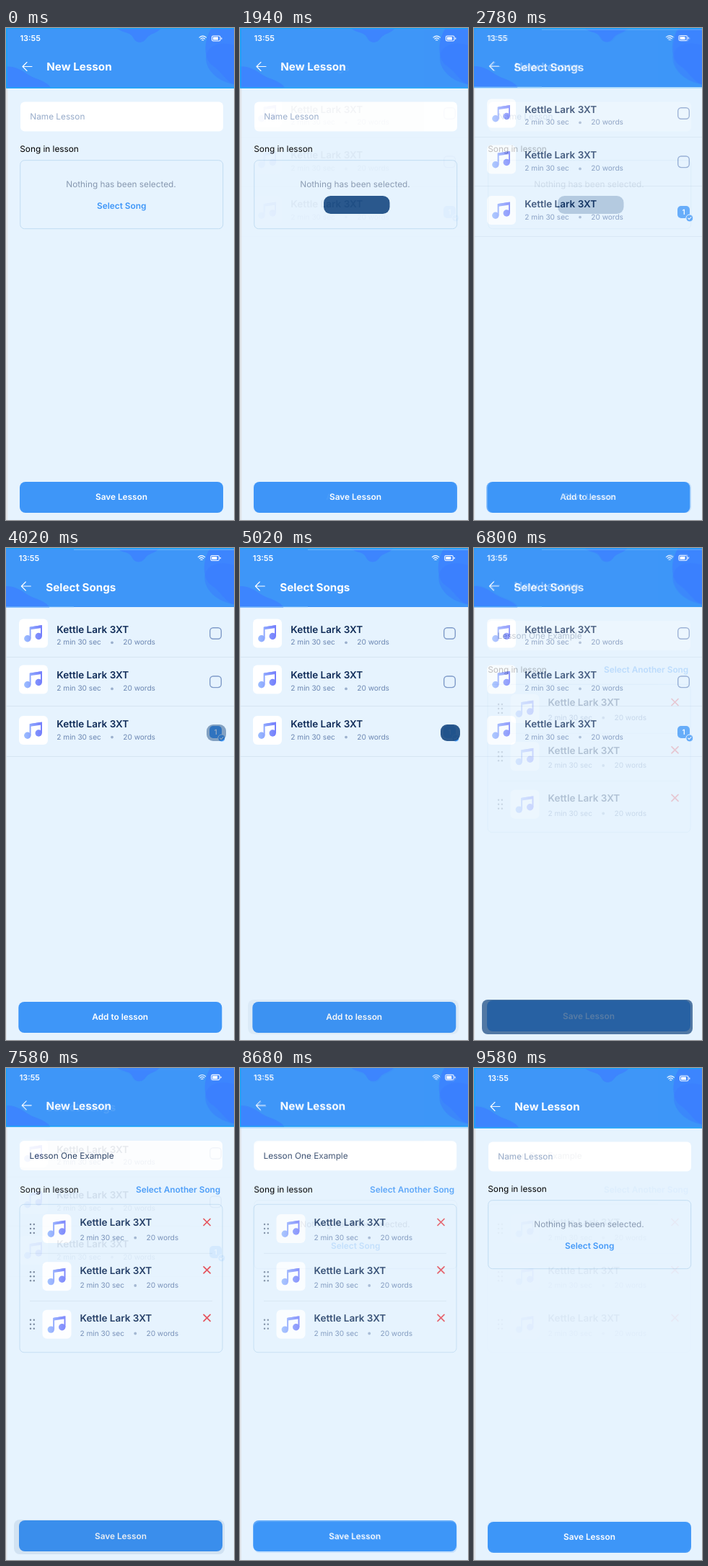
Recreate the animation shown at these times as an HTML page. Size 316 by 683 pixels, loop 9640 ms.

```html
<!DOCTYPE html>
<html lang="en">
<head>
<meta charset="utf-8">
<title>New Lesson</title>
<style>
  html, body { margin: 0; width: 100%; height: 100%; overflow: hidden; background: #e6f3fe; }
  svg.stage { display: block; width: 100vw; height: 100vh; }
  text { font: 400 11.8px Inter, sans-serif; text-rendering: geometricPrecision; }
  .mid { text-anchor: middle; }
  .semi { font-weight: 600; }
  .title { font-size: 15.2px; font-weight: 700; fill: #fff; }
  .clock { font-size: 10.9px; font-weight: 600; fill: #fff; }
  .name { font-size: 13.5px; font-weight: 600; fill: #0f2b57; }
  .meta { font-size: 10.1px; fill: #6c87b2; }
  .badge { font-size: 10px; font-weight: 600; fill: #fff; }
  .white { fill: #fff; }
  .blue { fill: #3e96f8; }
  .page { fill: #e6f3fe; }
  .blob { fill: #3d85fe; }
  .edge { fill: #e1e5ea; }
  .frame { fill: none; stroke: #c1dcf2; }
  .rule { stroke: #d6e5f2; fill: none; }
  .cyan { fill: none; stroke: #14a6f8; stroke-width: 1.4; }
  .line { fill: none; stroke: #fff; stroke-width: 1.1; stroke-linecap: round; stroke-linejoin: round; }
  .tap { fill: #205087; }

  /* Cross-fades advance in 60 ms steps over a 9640 ms loop. */
  .fade { opacity: 0; animation: 9640ms linear infinite; }
  .tap-select { animation-name: tap-select; }
  .songs { animation-name: songs; }
  .tap-check { animation-name: tap-check; }
  .tap-add { animation-name: tap-add; }
  .filled { animation-name: filled; }
  .restart { animation-name: restart; }
  @keyframes tap-select {
    0% { opacity: 0; }
    4.149% { opacity: 0; animation-timing-function: steps(20, start); }
    16.597%, 100% { opacity: 1; }
  }
  @keyframes songs {
    0% { opacity: 0; }
    20.124% { opacity: 0; animation-timing-function: steps(20, start); }
    32.572%, 100% { opacity: 1; }
  }
  @keyframes tap-check {
    0% { opacity: 0; }
    36.099% { opacity: 0; animation-timing-function: steps(20, start); }
    48.547% { opacity: 1; }
    52.074% { opacity: 1; animation-timing-function: steps(20, start); }
    64.522%, 100% { opacity: 0; }
  }
  @keyframes tap-add {
    0% { opacity: 0; }
    52.074% { opacity: 0; animation-timing-function: steps(20, start); }
    64.522%, 100% { opacity: 1; }
  }
  @keyframes filled {
    0% { opacity: 0; }
    68.049% { opacity: 0; animation-timing-function: steps(20, start); }
    80.497%, 100% { opacity: 1; }
  }
  @keyframes restart {
    0% { opacity: 0; }
    88.174% { opacity: 0; animation-timing-function: steps(19, start); }
    100% { opacity: .95; }
  }
</style>
</head>
<body>
<svg class="stage" viewBox="0 0 316 683" preserveAspectRatio="none">
  <defs>
    <linearGradient id="tone" gradientUnits="userSpaceOnUse" x1="7" y1="0" x2="31" y2="0">
      <stop offset="0" stop-color="#9cbeff"/>
      <stop offset="1" stop-color="#757ffc"/>
    </linearGradient>

    <g id="bar">
      <path class="blob" d="M153 0C163 8 172 5 176 13C180 22 190 22 195 14C200 7 208 9 215 0Z"/>
      <path class="blob" d="M285 0C273 18 274 44 286 52C300 61 306 78 322 80V0Z"/>
      <path d="M277 40C280 20 304 18 322 26V79C300 78 276 62 277 40Z" fill="#3b7dff" opacity=".5"/>
      <path class="blob" d="M-4 54C18 51 26 64 39 69C50 73 59 77 62 83H-4Z"/>
      <text class="clock" x="19.5" y="18.3">13:55</text>
      <path class="line" d="M268 13.2Q272.7 9 277.4 13.2M269.8 15.2Q272.7 12.6 275.6 15.2M271.6 17Q272.7 16 273.8 17"/>
      <rect class="line" x="285.5" y="11" width="11.5" height="7" rx="1.8" stroke-width=".9"/>
      <rect class="white" x="287" y="12.4" width="7" height="4.2" rx=".6"/>
      <rect class="white" x="298.2" y="13.2" width="1.2" height="2.6" rx=".6"/>
      <path class="line" d="M36 53.5H23.3M29 47.5L23 53.5L29 59.5"/>
    </g>

    <g id="thumb">
      <rect class="white" width="40" height="40" rx="6"/>
      <g fill="none" stroke="url(#tone)">
        <path d="M15.6 27V12L31 9.6V24" stroke-width="2"/>
        <path d="M15.6 12.8L31 10.6" stroke-width="3.8"/>
      </g>
      <circle cx="11.8" cy="27.3" r="4.7" fill="url(#tone)"/>
      <circle cx="27.2" cy="24" r="4.7" fill="url(#tone)"/>
    </g>

    <text id="name" class="name">Kettle Lark 3XT</text>
    <g id="meta">
      <text class="meta">2 min 30 sec</text>
      <circle cx="76.7" cy="-3" r="1.9" fill="#9bb0cd"/>
      <text class="meta" x="92">20 words</text>
    </g>

    <rect id="box" x=".7" y=".7" width="15.6" height="15.6" rx="4.5" fill="none" stroke="#7f9bc9" stroke-width="1.4"/>

    <g id="item">
      <g fill="#6f7f97">
        <circle cx="34" cy="14" r="1.2"/><circle cx="38.8" cy="14" r="1.2"/>
        <circle cx="34" cy="20" r="1.2"/><circle cx="38.8" cy="20" r="1.2"/>
        <circle cx="34" cy="26" r="1.2"/><circle cx="38.8" cy="26" r="1.2"/>
      </g>
      <use href="#thumb" x="50.5"/>
      <use href="#name" x="102.5" y="16.3"/>
      <use href="#meta" x="102.5" y="35.7"/>
      <path d="M274 6.5L283 15.5M283 6.5L274 15.5" stroke="#e5424d" stroke-width="1.7" stroke-linecap="round"/>
    </g>

    <g id="empty">
      <rect class="page" width="316" height="683"/>
      <rect class="edge" y="83" width="2.4" height="600"/>
      <rect class="blue" width="316" height="83.5"/>
      <use href="#bar"/>
      <rect class="cyan" x="1" y=".5" width="318" height="82.6"/>
      <text class="title" x="56.3" y="59.4">New Lesson</text>
      <rect class="white" x="20" y="102.5" width="281" height="41" rx="6"/>
      <text x="33.3" y="127.2" fill="#98acca">Name Lesson</text>
      <text x="19.3" y="172">Song in lesson</text>
      <rect class="frame" x="19.7" y="183.7" width="281" height="95" rx="6"/>
      <text class="mid" x="159.5" y="221.2" fill="#8798b0">Nothing has been selected.</text>
      <text class="mid semi blue" x="160.2" y="250.8">Select Song</text>
      <rect class="blue" x="19" y="630" width="282" height="43" rx="8"/>
      <text class="mid semi white" x="160" y="655.4">Save Lesson</text>
    </g>
  </defs>

  <use href="#empty"/>
  <rect class="tap fade tap-select" x="116" y="233" width="91.5" height="25" rx="9.5"/>

  <g class="fade songs">
    <rect class="page" width="316" height="683"/>
    <rect class="edge" y="82" width="1" height="601"/>
    <rect class="blue" width="316" height="82"/>
    <use href="#bar" x="-1.7" y="-.5"/>
    <path class="cyan" d="M0 .5H316"/>
    <path d="M94 2.3H316M0 81.8H94" stroke="#79bffa" stroke-width=".9"/>
    <text class="title" x="55.3" y="59.6">Select Songs</text>

    <use href="#thumb" x="18" y="98.5"/>
    <use href="#name" x="70.3" y="117.8"/>
    <use href="#meta" x="70.3" y="134.3"/>
    <use href="#box" x="282" y="110"/>

    <use href="#thumb" x="18" y="162.5"/>
    <use href="#name" x="70.3" y="181.3"/>
    <use href="#meta" x="70.3" y="198.4"/>
    <use href="#box" x="282" y="177.3"/>

    <use href="#thumb" x="18" y="233"/>
    <use href="#name" x="70.3" y="248.8"/>
    <use href="#meta" x="70.3" y="265.6"/>
    <rect class="blue" x="282" y="247" width="17" height="17" rx="5"/>
    <text class="badge mid" x="290.5" y="259.2">1</text>
    <circle class="blue" cx="298.8" cy="264" r="5" stroke="#e6f3fe"/>
    <path class="line" d="M296.8 264.1L298.3 265.5L300.9 262.7"/>

    <path class="rule" d="M0 151.5H316M0 219.5H316M0 289.5H316"/>
    <rect class="blue" x="17.3" y="630" width="282" height="43" rx="8"/>
    <text class="mid semi white" x="158.2" y="655.4">Add to lesson</text>
  </g>
  <rect class="tap fade tap-check" x="278" y="245" width="27" height="23" rx="9"/>
  <rect class="tap fade tap-add" x="11" y="627" width="292" height="48" rx="8"/>

  <g class="fade filled">
    <rect class="page" width="316" height="683"/>
    <rect class="edge" y="80" width="1.6" height="603"/>
    <rect class="blue" width="316" height="81"/>
    <use href="#bar" x="-.8" y="-1.6"/>
    <path class="cyan" d="M.5 0V81H316"/>
    <text class="title" x="55.6" y="57.7">New Lesson</text>
    <rect class="white" x="19" y="101" width="281" height="41" rx="6"/>
    <text x="32.6" y="125.8" fill="#1b3257">Lesson One Example</text>
    <text x="19.3" y="172.9">Song in lesson</text>
    <text class="semi blue" x="180" y="172.9">Select Another Song</text>
    <rect class="frame" x="19" y="189.3" width="281" height="205.5" rx="6"/>
    <use href="#item" y="203"/>
    <use href="#item" y="269.3"/>
    <use href="#item" y="335.8"/>
    <path class="rule" d="M33 257.3H286M33 323.5H286"/>
    <rect class="blue" x="18" y="628" width="282" height="43" rx="8"/>
    <text class="mid semi white" x="159" y="653.6">Save Lesson</text>
  </g>

  <use class="fade restart" href="#empty"/>
</svg>
</body>
</html>
```
